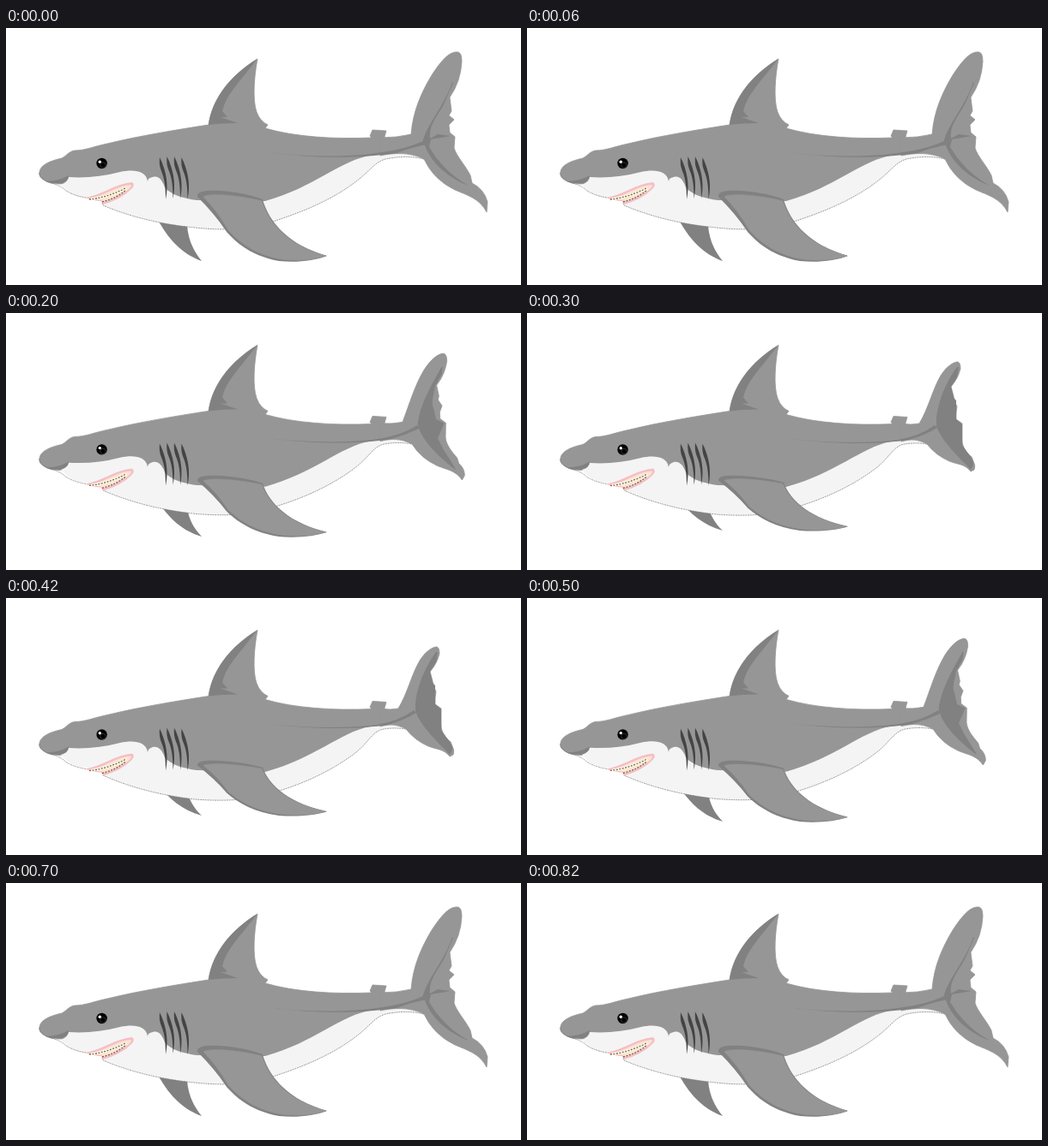
An HTML page that plays this animation: 600x300 px, repeating every 0.9 s.

```html
<!DOCTYPE html>
<html lang="en">
<head>
<meta charset="utf-8">
<title>Swimming shark</title>
<style>
  html, body { margin: 0; width: 100%; height: 100%; overflow: hidden; background: #fff; }
  svg { display: block; width: 100vw; height: 100vh; }
  .skin { fill: #969696; stroke: #969696; stroke-width: .8; }
  .shade { fill: #818181; }
  .white { fill: #f4f4f4; }
  .edge { fill: none; stroke: #777; stroke-width: .7; stroke-dasharray: 2 .8; }
</style>
</head>
<body>
<svg viewBox="0 0 600 300">
  <g id="farFin">
    <path class="shade" d="M178 226C190 247 205 264 228 272C218 260 212 246 211 230Z"/>
  </g>
  <g id="body">
    <path class="skin" d="M39 168C40 160 51 155 65 152C71 149 73 144 80 143C92 143 103 138 118 135
      C155 126 197 119 236 113C240 84 260 56 293 36C289 57 287 84 292 98Q296 109 305 113L302 117
      C336 127 382 130 426 128L424 126L427 119L443 120L441 127L442 147L300 215L200 215L66 182
      C59 182 53 182 47 179C41 176 38 173 39 168Z"/>
    <path class="shade" d="M236 113C240 84 260 56 293 36C271 64 256 79 252 97L258 104L250 104L270 111Q252 111 236 113Z"/>
    <path class="shade" d="M46 179Q61 179 73 172Q73 178 66 181Q55 182 46 179Z"/>
  </g>
  <path id="belly" class="white"/>
  <path id="bellyEdge" class="edge"/>
  <path id="tail" class="skin"/>
  <path id="tailShade" class="shade"/>
  <path id="keel" class="shade"/>
  <g id="face">
    <path class="edge" d="M39 169C39 175 46 179 53 181Q64 184 70 190Q80 196 93 198"/>
    <path fill="#f6bdc5" d="M92 198C112 195 126 182 147 180Q151 183 146 188Q134 200 113 206L111 202Q101 202 92 198Z"/>
    <path fill="#fbe5d1" d="M96 199C116 196 128 184 146 183Q146 187 139 191Q128 199 114 203L111 201Z"/>
    <path fill="none" stroke="#fffdf0" stroke-width="3" d="M99 200Q120 197 140 187"/>
    <path fill="none" stroke="#72664d" stroke-width="1.3" stroke-dasharray="2 1.5" d="M97 200Q118 198 139 187M112 203Q128 199 139 190"/>
    <circle cx="111.6" cy="158" r="6.2"/>
    <circle cx="109.3" cy="156.2" r="1.7" fill="#fff"/>
    <circle cx="113" cy="160" r="3.2" fill="none" stroke="#444" stroke-width=".7"/>
    <g id="gills" fill="#444"></g>
  </g>
  <g id="nearFin">
    <path class="shade" d="M223 197C222 190 234 189 250 190Q277 192 299 200C307 229 332 254 374 266
      C359 272 338 274 318 272C290 267 271 254 257 238Q244 218 223 197Z"/>
    <path class="skin" d="M230 197C239 192 274 196 298 202C307 231 332 255 373 266
      C358 271 340 272 322 270C291 265 273 251 259 236Q246 213 230 197Z"/>
  </g>
</svg>
<script>
const el = id => document.getElementById(id);
const setPath = (id, d) => el(id).setAttribute("d", d);

// Blend two paths that share the same commands.
function blend(from, to, k) {
  const goal = to.match(/[\d.]+/g);
  let i = 0;
  return from.replace(/[\d.]+/g, n => (+n + (goal[i++] - n) * k).toFixed(2));
}

const tail = [
  `M436 128Q456 128 472 124C474 97 484 75 496 55C507 38 516 28 525 28Q531 27 531 39
   Q530 62 517 81L519 97L516 102L522 107L516 113L517 122L523 127L522 140C525 150 535 160 541 172
   L543 181Q557 188 561 203L560 215C552 199 537 195 523 189Q498 177 487 153C469 144 451 146 436 149Z`,
  `M436 129Q448 131 457 129C468 111 472 90 482 73C489 62 497 57 502 57Q505 58 505 65
   Q502 77 494 86L497 97L497 101L501 109L500 117L500 124L507 129L507 148C507 157 512 163 518 168
   L520 173Q523 178 521 183L517 185C510 176 502 177 492 173Q476 166 466 153C455 147 447 147 436 150Z`
];
const tailShade = [
  `M520 63C511 91 490 112 485 134L488 137C496 160 519 177 539 184Q510 168 493 139
   L495 130L518 126L503 124L494 129C492 112 504 102 511 87L521 64L520 63Z`,
  `M501 63C487 82 476 110 477 130L477 132C483 150 504 169 517 183Q523 176 517 168
   L507 154L507 130L500 124L500 102C496 99 496 92 494 86L501 75L503 63Z`
];
const keel = [
  "M307 145C350 151 402 151 438 145Q467 141 486 132L490 136Q470 140 455 146C415 152 360 153 307 145Z",
  "M307 147C350 152 402 152 432 148Q457 144 475 131L478 134Q463 143 445 148C415 153 360 154 307 147Z"
];
const bellyEdge = [
  `M112 204L113 207Q160 227 220 233C247 236 276 236 301 229C344 216 381 200 408 179
   C424 167 429 157 442 153Q466 148 487 153`,
  `M112 204L113 207Q160 228 220 235C247 237 276 237 301 230C344 219 381 201 408 180
   C422 169 427 155 440 153Q453 151 466 153`
];
const bellyTop = [
  `C468 143 446 145 428 148C389 154 360 186 302 202L222 201C208 199 192 195 185 186
   C182 178 178 172 171 174Q165 175 165 179C163 166 148 165 133 168Q103 176 73 174
   Q73 179 64 183L71 190Q79 197 93 198Q109 198 112 204Z`,
  `C455 147 442 147 424 150C389 157 360 187 302 203L222 201C208 199 192 195 185 186
   C182 178 178 173 171 174Q165 176 165 180C163 167 148 166 133 169Q103 177 73 175
   Q73 180 64 183L71 190Q79 197 93 198Q109 198 112 204Z`
];

el("gills").innerHTML = [[179, 151], [187.5, 150], [196, 150], [204.5, 151]]
  .map(([x, y]) => `<path d="M${x} ${y}c4 8 12 27 7 49c0-13-1-24-5-33q-3-7-2-16z"/>`).join("");

const finScale = [1, .95, .866, .78];
const bodyDrop = [0, .9, 1.4, 1.5];

function poseAt(ms) {
  const step = Math.floor(ms / 100);
  return step < 3 ? step : Math.max(0, step < 5 ? 3 : 7 - step);
}

let shown = -1;
function draw(pose) {
  const k = pose / 3;
  const morph = pair => blend(...pair, k);
  const edge = morph(bellyEdge);
  setPath("tail", morph(tail));
  setPath("tailShade", morph(tailShade));
  setPath("keel", morph(keel));
  setPath("bellyEdge", edge);
  setPath("belly", edge + morph(bellyTop));
  for (const id of ["body", "face"])
    el(id).setAttribute("transform", `translate(0 ${bodyDrop[pose]})`);
  for (const id of ["farFin", "nearFin"])
    el(id).setAttribute("transform", `translate(0 190) scale(1 ${finScale[pose]}) translate(0 -190)`);
}

function tick() {
  const pose = poseAt(performance.now() % 900);
  if (pose !== shown) draw(shown = pose);
  requestAnimationFrame(tick);
}
tick();
</script>
</body>
</html>
```
